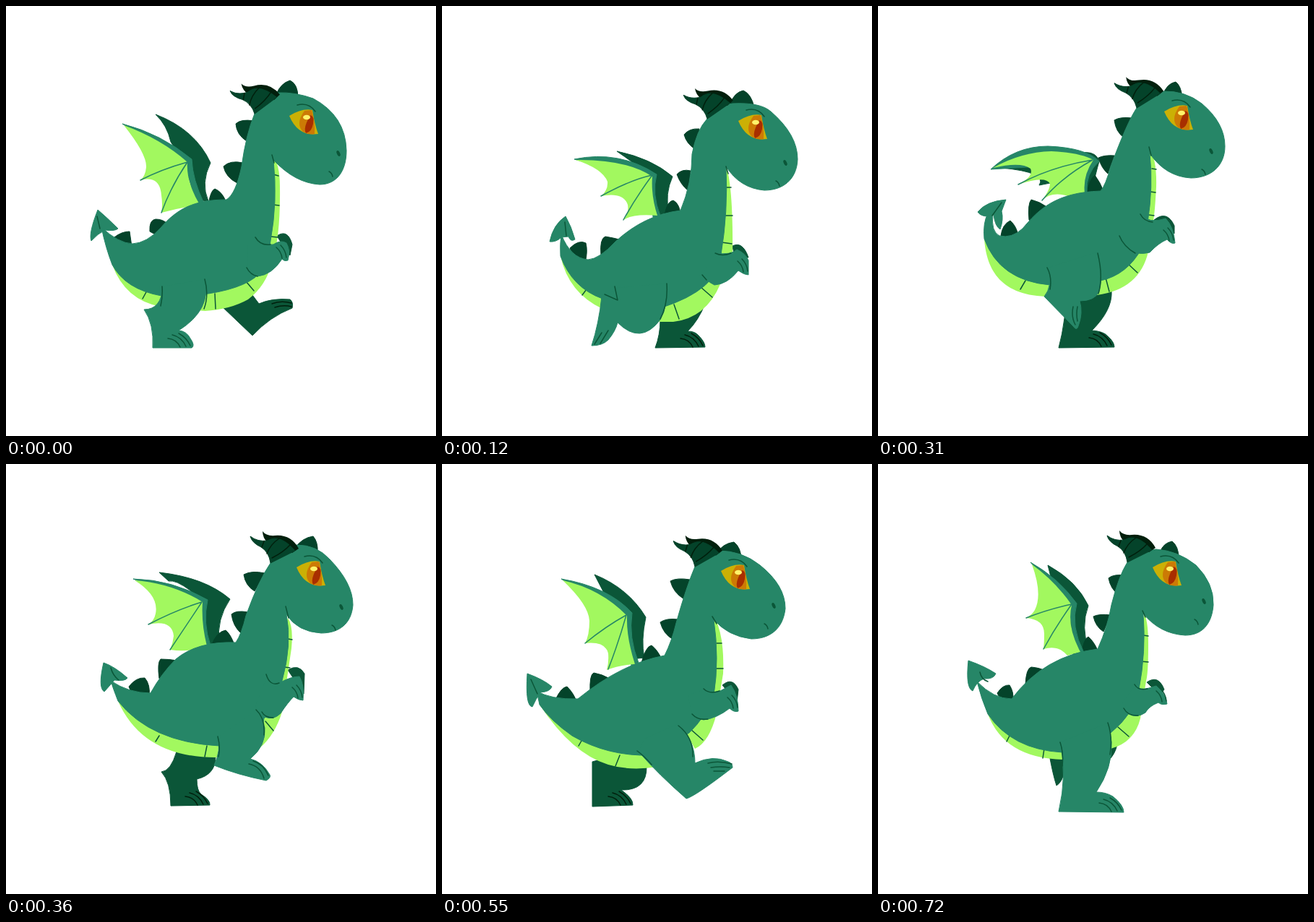
Animation of 595 by 595 pixels, one loop 0.84 s. Source, as an HTML page without scripts:

```html
<!DOCTYPE html>
<html lang="en">
<head>
<meta charset="utf-8">
<title>Walking dragon</title>
<style>
html, body { margin: 0; width: 100%; height: 100%; overflow: hidden; background: #fff; }
svg { display: block; width: 100%; height: 100%; }
.pose { visibility: hidden; animation: show 840ms step-end calc((var(--i) - 7) * 120ms) infinite; }
@keyframes show {
  0% { visibility: visible; }
  14.2857%, 100% { visibility: hidden; }
}
.far { fill: #0b5638; stroke: #0b5638; }
.spike { fill: #04432a; stroke: #04432a; }
.skin { fill: #268667; stroke: #268667; }
.glow { fill: #a2f85f; }
.line, .bone, .black { fill: none; stroke: #0b5638; stroke-width: 1.5; stroke-linecap: round; }
.bone { stroke: #268667; }
.black { stroke: #011f0c; }
</style>
</head>
<body>
<svg viewBox="0 0 595 595" stroke-linejoin="round">
<defs>
  <g id="horn">
    <path fill="#011f0c" d="M-11-44Q-6-37 6-38Q28-40 39-20L30-14L-4-28Q-11-35-11-44"/>
    <path class="spike" d="M-28-37Q-18-29-4-31Q13-41 34-17L0 0Q-2-15-13-22Q-26-28-28-37"/>
    <path class="black" d="M-12-22L-9-30M-5-13Q0-26 12-34M2-7Q18-15 28-26"/>
  </g>
  <g id="eye">
    <path fill="#cbb005" d="M-21-9Q-3-20 11-17Q14 3 19 16Q-9 20-21-9"/>
    <path fill="#cc7a05" d="M0-16Q-13 2-2 13Q6 18 14 16Q15 0 10-17Z"/>
    <path fill="#a82e00" d="M8-10Q14-9 12 2Q10 13 2 15Q-1 10 3 0Z"/>
    <ellipse cx="3" cy="-7" rx="5" ry="3.2" fill="#fff26a"/>
    <path class="line" d="M-10-24Q6-28 15-15"/>
  </g>
  <g id="snout">
    <ellipse rx="1.6" ry="3.6" transform="rotate(-25)" class="far"/>
    <path class="line" d="M-13 25Q-9 27-8 32"/>
  </g>
  <path id="toes" d="M-34-13Q-22-12-17-1M-28-18Q-15-15-9-2M-19-20Q-8-14-3-3"/>
  <path id="claws" d="M-9-21Q-2-14-1-4M-15-18Q-8-12-7-3"/>
</defs>

<g class="pose" style="--i:0">
  <path class="far" d="M207 150Q262 171 283 217Q269 245 280 270L262 268Q250 220 228 188Q223 165 207 150M298 415L341 456Q365 430 396 418Q398 410 393 406Q368 404 350 412L338 396ZM375 318Q390 308 396 330L393 345L385 335Z"/>
  <path class="spike" d="M374 122Q380 107 393 103Q404 108 404 127ZM343 159Q325 156 318 163Q319 178 333 187ZM328 217Q310 213 301 222Q304 237 320 245ZM280 275Q283 255 289 253Q299 257 304 270ZM199 312Q198 296 207 295Q216 295 222 300L210 318ZM150 320Q160 312 171 312L174 333L154 328Z"/>
  <path class="skin" d="M161 163Q215 177 257 212Q258 240 274 273L262 273L248 218Z"/>
  <path class="glow" d="M163 165Q195 205 194 223Q193 235 186 241Q213 234 215 262Q217 275 215 286Q240 279 268 275Q249 243 251 216Q215 184 163 165M368 205Q379 218 379 250Q380 320 368 355Q360 387 335 406Q310 420 275 422L214 416Q165 407 147 358L250 380L355 330Z"/>
  <path class="bone" d="M251 216Q215 226 186 241M251 216Q228 250 215 286"/>
  <path class="line" d="M370 233L377 235M370 275L378 276M366 319L376 320M332 381L343 394M289 398L290 419M195 394L189 405"/>
  <path class="skin" d="M344 149Q356 124 376 120Q400 119 425 128Q470 152 471 200C471 228 458 247 434 247Q400 245 370 213Q376 270 366 325Q362 355 355 365Q338 389 280 398L215 401Q165 392 147 358Q138 335 132 306Q155 328 175 329Q195 328 214 307C236 281 260 268 305 268Q318 260 326 222Q332 178 344 149"/>
  <path class="skin" d="M127 282Q140 293 155 308Q150 312 137 310Q127 315 118 325Q114 315 127 282"/>
  <path class="skin" d="M217 388Q215 420 191 420Q205 440 203 473L257 473Q262 470 255 460Q250 450 239 449Q285 420 275 378Z"/>
  <path class="skin" d="M345 320Q355 332 370 330Q380 323 388 328Q394 338 390 352Q385 354 382 350Q368 372 348 374Q338 370 334 362L335 330Z"/>
  <path class="line" d="M216 388Q217 402 214 415M275 378Q281 400 274 419M345 320Q352 332 366 330M333 362Q338 372 348 374M368 206L371 217M126 291L130 308"/>
  <use href="#toes" x="258" y="473" class="line"/>
  <use href="#claws" x="389" y="352" class="line"/>
  <path class="black" d="M368 412Q380 407 395 411M372 417Q384 413 395 416"/>
  <use href="#horn" transform="translate(344 149) rotate(-10)"/><use href="#eye" x="413" y="161"/><use href="#snout" x="460" y="204"/>
</g>

<g class="pose" style="--i:1">
  <path class="far" d="M242 201Q290 211 319 236Q308 260 314 286L296 290L290 235Q262 215 242 201M302 434Q302 455 295 473L364 472Q364 465 355 456Q350 450 340 450Q355 435 364 412ZM402 332Q416 325 424 348L405 348Z"/>
  <path class="spike" d="M398 136Q405 119 417 117Q428 122 432 140ZM356 170Q342 169 335 178Q338 190 350 198ZM344 228Q332 225 325 233Q330 247 341 256ZM308 290Q311 270 320 269Q328 273 330 287ZM220 345Q218 322 226 319Q238 321 245 323L232 340ZM177 335Q189 323 199 328Q202 340 198 355L182 347Z"/>
  <path class="skin" d="M183 212Q245 199 297 233Q290 260 302 290L292 292L288 240Z"/>
  <path class="glow" d="M185 213Q222 225 229 243Q230 255 220 263Q251 257 257 275Q259 287 251 296Q265 287 298 290Q289 262 291 236Q255 212 185 213M393 221Q403 250 402 345L385 385Q365 432 320 437L302 437L222 419Q175 397 164 346L280 380L370 320Z"/>
  <path class="bone" d="M291 234Q262 240 220 263M291 234Q268 265 251 296"/>
  <path class="line" d="M391 251L400 251M391 290L402 290M387 327L401 329M358 389L374 403M321 413L328 433M200 392L194 400"/>
  <path class="skin" d="M367 156Q382 137 402 135Q440 133 455 146Q492 178 492 212C491 240 472 255 446 255Q412 252 393 222Q396 285 386 344Q384 392 302 418Q240 420 222 405Q180 390 164 346Q163 330 165 316Q178 349 202 351Q218 350 240 326Q280 289 330 283Q346 245 346 205Q352 172 367 156"/>
  <path class="skin" d="M171 291Q154 302 149 326Q158 327 165 320L175 319Q178 327 184 323Q179 305 171 291"/>
  <path class="skin" d="M240 390Q232 400 221 402Q217 440 207 470Q222 470 230 462Q240 450 243 438Q275 470 302 434Q313 415 311 384Z"/>
  <path class="skin" d="M378 342Q400 345 408 337Q420 342 424 352L424 372Q418 372 410 366Q395 385 377 386Q365 380 360 372Z"/>
  <path class="line" d="M311 384Q313 412 302 433M225 399L243 407L239 388M378 342Q388 347 400 342M360 372L366 379M393 222L396 232M170 299L172 318M211 468L221 452M219 467L230 449"/>
  <use href="#claws" x="424" y="371" class="line"/>
  <use href="#toes" x="364" y="473" class="black"/>
  <use href="#horn" transform="translate(367 156) rotate(-8)"/><use href="#eye" x="431" y="168"/><use href="#snout" x="475" y="217"/>
</g>

<g class="pose" style="--i:2">
  <path class="far" d="M171 224Q195 214 240 215Q300 190 306 215Q301 232 296 256L288 260Q280 235 223 248Q235 230 171 224M258 432Q255 455 250 473L327 472Q327 465 318 457Q312 450 296 449Q325 420 323 394L260 400ZM382 296Q400 282 410 304L410 315Z"/>
  <path class="spike" d="M394 123Q400 107 412 105Q419 110 421 126ZM352 155Q335 153 327 158Q329 174 340 182ZM327 207Q314 206 305 210Q309 224 318 232ZM289 260Q292 240 300 234Q308 245 312 256ZM209 296Q207 274 212 268Q224 271 232 277L215 300ZM170 318Q172 302 183 297Q192 305 194 318L182 324Z"/>
  <path class="skin" d="M156 226Q190 194 235 194Q288 196 306 215Q287 232 289 258L280 259L288 218Z"/>
  <path class="glow" d="M159 224Q198 202 240 201Q280 203 298 213Q283 235 286 259L263 263Q240 256 227 269Q238 254 238 246Q232 234 194 247Q216 236 211 225Q198 215 159 224M375 195Q386 212 385 250Q383 290 380 302L374 340Q362 392 303 400L238 402C170 402 150 365 147 322L260 350L360 310Z"/>
  <path class="bone" d="M297 213Q240 222 194 247M297 213Q255 236 227 269"/>
  <path class="line" d="M379 225L385 226M377 257L384 258M374 289L382 290M344 355L359 369M315 376L320 395M204 380L197 392"/>
  <path class="skin" d="M358 141Q372 118 394 118Q425 117 448 135Q480 162 480 194C480 222 460 238 433 238Q398 236 376 204Q381 250 373 300L365 335Q345 372 308 380Q260 388 238 386Q168 380 147 322Q145 300 152 287L159 288Q156 312 168 318Q185 322 200 308C222 282 245 258 308 256Q315 248 322 222Q345 160 358 141"/>
  <path class="skin" d="M177 268Q150 270 138 285Q142 291 152 291L160 289Q162 305 169 309Q174 295 171 284Z"/>
  <path class="skin" d="M236 362Q242 388 230 402L270 443Q275 450 277 443Q284 425 279 408Q300 408 306 395Q312 370 304 340Z"/>
  <path class="skin" d="M363 288Q375 302 398 294Q409 305 411 328Q406 330 400 323Q388 328 376 341Q360 345 350 338Q340 328 334 318Z"/>
  <path class="line" d="M304 342Q312 375 305 398M234 362Q241 375 238 392M363 288Q368 298 380 299M334 318Q340 333 356 342M375 195L378 207M171 272L158 290M270 416Q267 430 273 441M276 416Q274 426 276 436"/>
  <use href="#claws" x="410" y="328" class="line"/>
  <use href="#toes" x="326" y="472" class="black"/>
  <use href="#horn" transform="translate(358 141) rotate(-5)"/><use href="#eye" x="417" y="155"/><use href="#snout" x="461" y="201"/>
</g>

<g class="pose" style="--i:3">
  <path class="far" d="M212 150Q275 157 310 187Q291 215 295 247L272 250Q280 200 255 175Q235 160 225 162ZM236 398Q228 425 215 426Q228 440 228 473L282 472Q283 465 270 457Q264 452 264 436Q290 430 290 405ZM390 285Q405 276 413 290L412 318L400 300Z"/>
  <path class="spike" d="M400 116Q410 102 425 100Q432 108 431 123ZM358 151Q340 147 329 153Q331 168 344 176ZM335 205Q318 202 312 208Q314 224 325 234ZM284 252Q291 232 304 230Q311 236 316 250ZM212 297Q209 275 214 270Q226 270 237 272L224 292ZM170 308Q180 295 192 296Q200 305 198 322L174 318Z"/>
  <path class="skin" d="M176 159Q230 160 279 188Q272 220 283 251L274 253L268 194Z"/>
  <path class="glow" d="M178 161Q212 182 207 207Q205 217 197 222Q230 215 232 238Q231 248 227 257Q255 261 278 252Q270 220 272 191Q230 165 178 161M390 213Q398 225 395 255L382 343Q372 375 352 392L350 330ZM155 328Q190 407 293 406L296 370Z"/>
  <path class="bone" d="M271 191Q235 202 197 222M271 191L227 257"/>
  <path class="line" d="M390 242L396 243M385 281L393 282M359 356L370 369M212 376L207 384M278 390L275 405"/>
  <path class="skin" d="M366 137Q380 114 402 112Q430 112 448 132Q480 165 480 195C478 222 460 234 436 234Q403 232 388 208Q396 250 382 300Q378 335 357 352L350 390L295 390Q200 385 155 328Q148 310 145 300Q170 317 200 317Q215 290 235 270Q265 245 318 247Q326 235 332 210Q350 160 366 137"/>
  <path class="skin" d="M135 275Q150 280 168 296Q165 301 150 299Q145 305 136 315Q127 310 135 275Z"/>
  <path class="skin" d="M293 378Q298 395 288 417Q320 430 360 438Q367 434 365 430Q355 412 338 408Q360 390 358 365Q352 348 346 340Z"/>
  <path class="skin" d="M362 292Q368 308 380 302Q395 294 406 294Q413 305 411 327Q405 327 398 322Q390 330 380 345Q370 355 358 350Q350 345 345 335Z"/>
  <path class="line" d="M293 377Q297 392 294 405M346 340Q359 352 357 375M360 291Q365 308 378 303M354 343Q358 351 370 351M387 197L391 213M145 282Q148 293 156 299M336 415Q352 418 357 435M342 411Q356 415 363 431"/>
  <use href="#claws" x="411" y="327" class="line"/>
  <use href="#toes" x="282" y="473" class="black"/>
  <use href="#horn" x="366" y="137"/><use href="#eye" x="423" y="152"/><use href="#snout" x="464" y="198"/>
</g>

<g class="pose" style="--i:4">
  <path class="far" d="M211 153Q258 172 282 212Q275 245 280 268L262 270Q265 215 225 180ZM208 412L208 474L264 472Q265 463 248 451Q284 452 283 418Q245 420 215 410ZM388 306Q402 294 410 312L408 330Z"/>
  <path class="spike" d="M380 124Q388 110 404 108Q414 116 414 132ZM343 160Q325 157 316 162Q320 178 335 187ZM327 215Q310 213 302 219Q306 235 320 243ZM276 275Q282 252 290 251Q298 257 304 270ZM205 316Q204 291 210 289Q222 291 232 297L218 312ZM157 326Q165 309 173 308Q183 318 186 329L160 330Z"/>
  <path class="skin" d="M165 159Q230 170 263 206Q258 240 272 275L262 279L252 214Z"/>
  <path class="glow" d="M167 161Q203 195 204 217Q204 237 198 248Q226 245 230 262Q231 275 228 285Q245 278 267 277Q255 240 256 210Q220 173 167 161M378 214Q391 240 389 290L380 345Q370 385 350 394L330 360ZM135 333Q180 401 230 416Q260 425 298 419L270 390Z"/>
  <path class="bone" d="M255 209Q226 225 198 248M255 209Q245 245 230 284"/>
  <path class="line" d="M380 248L387 248M378 283L389 283M344 367L361 382M193 383L189 390M246 403L240 418"/>
  <path class="skin" d="M350 142Q362 122 382 120Q415 120 440 140Q475 168 475 200C472 228 454 242 428 242Q395 238 376 215Q384 270 376 320Q365 350 342 372L290 403Q230 405 180 376Q150 355 135 333L131 314Q150 326 188 325Q248 276 308 265Q318 245 324 220Q338 170 350 142"/>
  <path class="skin" d="M118 290Q140 298 152 308Q150 315 136 316Q130 325 125 336Q115 335 118 290Z"/>
  <path class="skin" d="M272 398Q300 430 338 463Q350 460 402 420Q402 414 396 412Q375 402 350 414Q350 380 325 360L280 380Z"/>
  <path class="skin" d="M362 312Q370 318 385 314L400 306Q410 320 410 342Q404 344 398 338Q380 352 362 354Q350 352 346 345L340 320Z"/>
  <path class="line" d="M270 397Q280 404 290 416M327 362Q348 378 347 405M362 311Q370 319 384 314M346 346Q354 355 368 353M374 211L380 221M123 298L132 318M368 414Q382 410 401 415M372 420Q385 418 398 420M376 425L391 425"/>
  <use href="#claws" x="410" y="341" class="line"/>
  <use href="#toes" x="264" y="473" class="black"/>
  <use href="#horn" transform="translate(350 142) rotate(-3)"/><use href="#eye" x="407" y="157"/><use href="#snout" x="459" y="196"/>
</g>

<g class="pose" style="--i:5">
  <path class="far" d="M229 170Q275 182 303 230Q293 260 301 284L285 287Q285 225 240 188ZM216 412Q218 440 206 461Q222 462 242 438Q265 455 285 450Q295 445 293 430ZM394 326Q407 313 414 328L414 350Z"/>
  <path class="spike" d="M403 134Q410 118 424 116Q433 124 433 140ZM362 164Q345 162 337 167Q340 180 355 186ZM345 213Q330 212 323 218Q327 235 340 240ZM303 286Q308 263 315 261Q325 270 330 282ZM227 328Q224 303 229 301Q240 303 250 308L238 325ZM180 339Q187 325 195 324Q202 332 204 347L184 344Z"/>
  <path class="skin" d="M184 179Q250 183 291 221Q280 250 297 286L284 290L282 228Z"/>
  <path class="glow" d="M187 180Q221 205 224 228Q223 246 205 255Q236 252 241 270Q241 285 235 295Q253 275 272 295L290 288Q277 250 286 224Q250 190 187 180M387 215Q397 230 395 280L385 375Q372 410 352 416L345 370ZM163 365Q190 427 294 436L290 400Z"/>
  <path class="bone" d="M285 223Q243 236 205 255M285 223Q262 260 236 294"/>
  <path class="line" d="M387 247L395 248M386 279L394 280M382 326L392 327M360 380L378 394M214 403L209 412M271 418L268 434"/>
  <path class="skin" d="M366 152Q382 132 403 132Q435 133 455 145Q495 175 495 210C492 238 473 254 445 254Q405 250 386 217Q392 280 383 333Q375 365 352 388L295 419Q195 410 163 365Q155 345 155 328Q175 343 205 343Q250 283 329 279Q338 255 343 225Q355 172 366 152"/>
  <path class="skin" d="M153 293Q170 307 179 320Q175 325 162 323Q155 330 142 343Q132 340 153 293Z"/>
  <path class="skin" d="M288 412Q300 430 298 455Q290 465 291 478L375 477Q377 470 366 455Q355 450 343 455Q357 425 352 385Z"/>
  <path class="skin" d="M370 326Q378 337 390 335L400 330Q414 342 411 363Q404 361 400 358Q390 375 380 375Q368 373 360 366L355 340Z"/>
  <path class="line" d="M287 411Q296 424 296 437M352 385Q356 405 352 420M370 325Q376 336 388 335M361 366Q368 374 378 374M386 208L389 220M157 304Q161 312 160 320M212 456L221 443M220 456L229 442"/>
  <use href="#toes" x="375" y="478" class="line"/>
  <use href="#claws" x="411" y="362" class="line"/>
  <use href="#horn" x="366" y="152"/><use href="#eye" x="429" y="168"/><use href="#snout" x="477" y="213"/>
</g>

<g class="pose" style="--i:6">
  <path class="far" d="M235 140Q275 162 291 196Q280 225 292 260L270 264Q270 200 240 160ZM237 402Q242 430 247 445Q255 440 258 425L258 402ZM318 392L331 388Q328 402 319 410ZM372 302Q388 291 396 312L390 320Z"/>
  <path class="spike" d="M390 122Q395 109 407 107Q416 114 416 130ZM344 154Q325 152 319 158Q322 173 332 180ZM322 209Q306 207 298 211Q301 225 312 232ZM281 264Q285 241 291 239Q299 246 304 258ZM204 305Q205 283 212 281Q224 282 231 286L216 302ZM165 317Q173 305 182 306Q188 315 187 328L168 323Z"/>
  <path class="skin" d="M211 136Q250 158 275 193Q266 225 285 261L274 264L264 198Z"/>
  <path class="glow" d="M213 139Q228 180 217 202Q213 209 205 213Q230 215 230 235Q230 248 229 256Q250 250 262 265L280 260Q261 225 268 195Q245 162 213 139M369 208Q374 220 374 250Q374 290 371 300L363 352Q355 385 322 394L315 365ZM152 346Q175 407 256 409L258 380Z"/>
  <path class="bone" d="M268 194Q235 201 205 213M268 194Q246 225 229 256"/>
  <path class="line" d="M367 237L374 238M363 273L374 274M332 364L347 377M182 376L178 384M230 394L228 407"/>
  <path class="skin" d="M345 136Q360 118 385 118Q415 120 440 140Q465 165 464 195C462 222 448 237 425 237Q390 235 367 207Q371 260 361 312Q355 345 322 372L255 399Q185 395 152 346Q143 325 137 301Q160 325 185 325Q230 265 304 256Q318 225 323 195Q333 155 345 136"/>
  <path class="skin" d="M125 272Q148 280 163 290Q160 298 147 297Q137 300 131 314Q121 310 125 272Z"/>
  <path class="skin" d="M252 385Q262 430 250 481L340 482Q340 472 325 460Q315 454 302 454Q325 420 323 385L318 358Z"/>
  <path class="skin" d="M356 306Q362 314 375 310L385 307Q398 318 400 332Q392 334 388 330Q375 335 370 344Q358 352 347 346Q340 342 338 330Z"/>
  <path class="line" d="M252 385Q257 400 255 418M318 358Q325 378 321 402M355 305Q360 314 373 311M340 338Q346 349 360 348M366 203L370 212M141 288Q143 298 152 301M246 420L250 440"/>
  <use href="#toes" x="340" y="482" class="line"/>
  <use href="#claws" x="400" y="332" class="line"/>
  <use href="#horn" x="345" y="136"/><use href="#eye" x="401" y="152"/><use href="#snout" x="451" y="190"/>
</g>
</svg>
</body>
</html>
```
